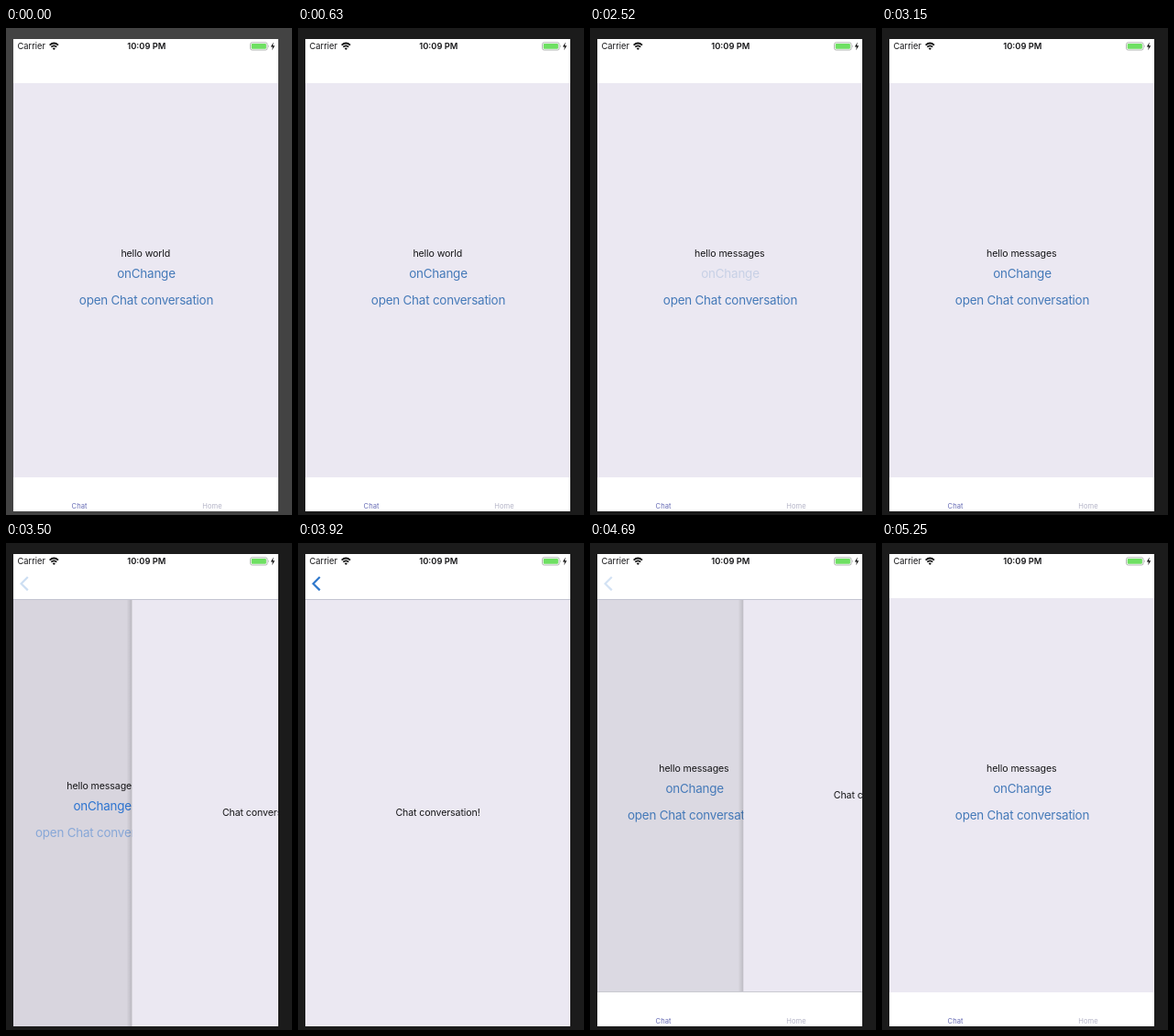
Recreate the animation shown at these times as an HTML page. Size 312 px wide and 530 px high, loop 5.32 s.

```html
<!DOCTYPE html>
<html lang="en">
<head>
<meta charset="utf-8">
<title>Chat navigation</title>
<style>
  html, body { margin: 0; width: 100%; height: 100%; overflow: hidden; background: #1b1b1b; }
  svg { display: block; width: 312px; height: 530px; }
  text { font-family: Inter, Roboto, sans-serif; fill: #151517; }
  .label { font-size: 10.6px; letter-spacing: -0.1px; text-anchor: middle; }
  .link { font-size: 13.4px; letter-spacing: -0.2px; text-anchor: middle; fill: inherit; }
  .status { font-size: 9.3px; }
  .tab { font-size: 7.6px; text-anchor: middle; }
</style>
</head>
<body>
<svg viewBox="0 0 312 530" xmlns="http://www.w3.org/2000/svg">
  <defs>
    <clipPath id="screen"><rect x="8" y="12" width="289" height="514"/></clipPath>
    <clipPath id="bodyClip"><rect id="bodyBox" x="8" y="60" width="289" height="429"/></clipPath>
    <linearGradient id="edge">
      <stop offset="0" stop-color="#000" stop-opacity="0"/>
      <stop offset="1" stop-color="#000" stop-opacity=".14"/>
    </linearGradient>
  </defs>

  <rect id="desk" width="312" height="530" fill="#434343"/>
  <g clip-path="url(#screen)">
    <rect x="8" y="12" width="289" height="514" fill="#fff"/>

    <g clip-path="url(#bodyClip)">
      <rect x="8" y="60" width="289" height="466" fill="#ebe8f2"/>
      <rect id="dim" x="8" y="60" width="289" height="466" fill="#000"/>
      <g id="home">
        <text id="hello" class="label" x="152.3" y="249">hello world</text>
        <text id="change" class="link" x="153" y="272">onChange</text>
        <text id="open" class="link" x="153" y="301">open Chat conversation</text>
      </g>
      <g id="chat">
        <rect x="2" y="60" width="6" height="466" fill="url(#edge)"/>
        <rect x="8" y="60" width="289" height="466" fill="#ebe8f2"/>
        <text id="chatText" class="label" x="152.5" y="278">Chat conversation!</text>
      </g>
    </g>

    <g id="tabs">
      <text class="tab" x="80" y="523" style="fill:#666bb4">Chat</text>
      <text class="tab" x="225" y="523" style="fill:#b3b3c6">Home</text>
      <rect id="tabLine" x="8" y="488" width="289" height="1" fill="#c9c9d0"/>
    </g>

    <g id="navLine">
      <rect x="8" y="60" width="289" height="1" fill="#fff"/>
      <rect x="8" y="61" width="289" height="1" fill="#c3c4d1"/>
    </g>
    <path id="back" d="M23.8 37 L16.6 44.2 L23.8 51.4" fill="none" stroke="#2f78cc" stroke-width="2.2"/>

    <text class="status" x="12.5" y="23">Carrier</text>
    <g fill="none" stroke="#111" stroke-width="1.7">
      <path d="M47.6 18.6 Q52.3 14.4 57 18.6"/>
      <path d="M49.3 20.7 Q52.3 18.1 55.3 20.7"/>
    </g>
    <path d="M50.6 22 Q52.3 20.8 54 22 L52.3 24 Z" fill="#111"/>
    <text class="status" x="153.3" y="23.2" text-anchor="middle" font-weight="600">10:09 PM</text>
    <rect x="266.5" y="15.8" width="18.6" height="8.2" rx="2" fill="#fff" stroke="#a0a5a0" stroke-width=".8"/>
    <rect x="267.7" y="17" width="16.2" height="5.8" rx="1" fill="#6ee062"/>
    <path d="M286.2 18.6 q1.4 1.3 0 2.6 z" fill="#a0a5a0"/>
    <path d="M291.8 15.6 L288.8 20.5 H290.9 L290.2 24.2 L293.2 19.2 H291.1 Z" fill="#111"/>
  </g>
</svg>
<script>
const LOOP = 5320;
const PUSH = 3415, POP = 4605, SLIDE = 500;
const RELEASE = 2500;
const WIDTH = 289;

const $ = id => document.getElementById(id);
const set = (id, name, value) => $(id).setAttribute(name, value);
const show = (id, on) => set(id, "visibility", on ? "visible" : "hidden");
const ramp = (t, start, span) => Math.min(1, Math.max(0, (t - start) / span));
const inOut = u => u < 0.5 ? 2 * u * u : 1 - 2 * (1 - u) * (1 - u);
const bezier = (a, b, s) => 3 * (1 - s) * (1 - s) * s * a + 3 * (1 - s) * s * s * b + s * s * s;

// Navigation curve: quick start, long settle
function slide(u) {
  if (u <= 0 || u >= 1) return u;
  let lo = 0, hi = 1;
  for (let i = 0; i < 24; i++) {
    const mid = (lo + hi) / 2;
    if (bezier(0.2833, 0.3183, mid) < u) lo = mid; else hi = mid;
  }
  return bezier(0.99, 0.99, lo);
}

// Touch feedback: fades to 20 % while held
function touch(t, down, up) {
  const held = inOut(ramp(t, down, 150)) * (1 - inOut(ramp(t, up, 250)));
  return 1 - 0.8 * held;
}

function backOpacity(t) {
  if (t < 4400) return ramp(t, PUSH, 350);
  return 0.28 * (1 - ramp(t, POP, 350));
}

function draw(t) {
  const cover = slide(ramp(t, PUSH, SLIDE)) - slide(ramp(t, POP, SLIDE));
  const full = t >= PUSH && t < POP;
  const active = t >= PUSH && t < POP + SLIDE;
  const drop = full ? 19 : 0;

  const shade = Math.round(67 - 40 * ramp(t, 350, 280));
  set("desk", "fill", `rgb(${shade},${shade},${shade})`);

  set("bodyBox", "height", full ? 466 : 429);
  set("home", "transform", `translate(${-0.3 * WIDTH * cover} ${drop})`);
  set("home", "fill", full ? "#2b73d0" : "#4479b8");
  set("dim", "opacity", 0.15 * cover);
  set("chat", "transform", `translate(${WIDTH * (1 - cover)} 0)`);
  set("chatText", "transform", `translate(0 ${drop})`);
  show("chat", active);

  $("hello").textContent = t < RELEASE ? "hello world" : "hello messages";
  set("change", "opacity", touch(t, 2070, RELEASE));
  set("open", "opacity", touch(t, 3150, 3400));

  show("tabs", !full);
  show("tabLine", active && !full);
  show("navLine", active);
  set("back", "opacity", backOpacity(t));
}

const begin = performance.now();
function tick() {
  draw((performance.now() - begin) % LOOP);
  requestAnimationFrame(tick);
}
draw(0);
requestAnimationFrame(tick);
</script>
</body>
</html>
```
